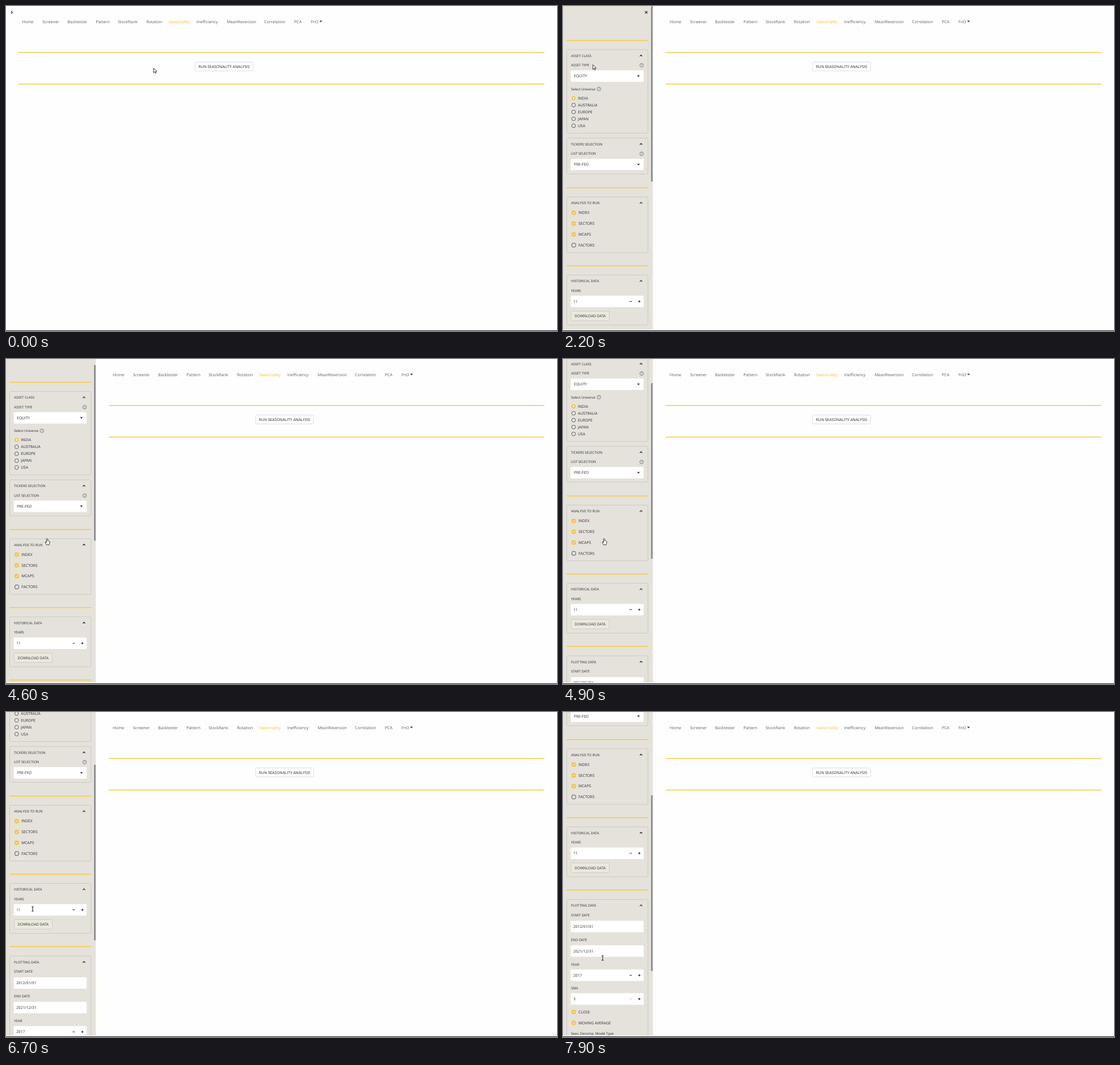
Write an HTML page with a canvas that moves like this. It is 960 px wide and 566 px high and loops after 8000 ms.

```html
<!DOCTYPE html>
<html lang="en">
<head>
<meta charset="utf-8">
<title>Seasonality dashboard</title>
<style>
html, body { margin: 0; width: 100%; height: 100%; overflow: hidden; background: #fefefe; }
canvas { display: block; }
</style>
</head>
<body>
<canvas id="stage" width="960" height="566"></canvas>
<script>
const ctx = document.getElementById('stage').getContext('2d');
const LOOP = 8000, STEP = 100, FULL = 158;
const INK = '#2b2c33', GOLD = '#f5c53a', PANEL = '#e5e2db', EDGE = '#cdcac3';

// time, pointer x, pointer y, sidebar scroll
const keys = [
  [0, 257, 108, 0], [900, 13, 11, 0], [1100, 9.5, 12.5, 0], [1500, 9.5, 12.5, 0],
  [1800, 12, 51, 0], [2300, 62, 115, 0], [2500, 62, 115, 0], [3100, 31, 160, 0],
  [3200, 31, 160, 0], [3300, 33.5, 161, 0], [3600, 33.5, 161, 0], [3700, 34.5, 162, 0],
  [4500, 71.5, 312.5, 0], [4900, 71.5, 312.5, 78], [5400, 23, 299, 113], [5700, 23, 299, 113],
  [6500, 46.5, 343, 170], [6700, 46.5, 343, 170], [7300, 69, 428.5, 225],
  [7400, 69, 428.5, 225], [7900, 69, 428.5, 268.5]
];

const nav = [['Home', 28], ['Screener', 63.5], ['Backtester', 107], ['Pattern', 156.5],
  ['StockRank', 195], ['Rotation', 244.5], ['Seasonality', 283.3], ['Inefficiency', 332],
  ['MeanReversion', 385], ['Correlation', 450], ['PCA', 502], ['FnO', 531]];

function stateAt(t) {
  const i = keys.findIndex(k => k[0] > t);
  if (i < 0) return keys[keys.length - 1].slice(1);
  const a = keys[i - 1], b = keys[i], p = (t - a[0]) / (b[0] - a[0]);
  return [1, 2, 3].map(n => a[n] + (b[n] - a[n]) * p);
}

// how far the sidebar still is from its full width
function widthLeft(t) {
  if (t < 1200) return FULL;
  return t < 1800 ? FULL * 0.4458 ** ((t - 1200) / 100) : 0;
}

function text(s, x, y, size = 6.6, color = INK, align = 'left') {
  ctx.font = `${size}px "Open Sans", "Noto Sans", sans-serif`;
  ctx.textAlign = align;
  ctx.fillStyle = color;
  ctx.fillText(s, x, y + size * 0.36);
}

function box(x, y, w, h, r, fill, stroke) {
  ctx.beginPath();
  ctx.roundRect(x, y, w, h, r);
  if (fill) { ctx.fillStyle = fill; ctx.fill(); }
  if (stroke) { ctx.strokeStyle = stroke; ctx.lineWidth = 1; ctx.stroke(); }
}

function path(points, color, width = 1.1) {
  ctx.beginPath();
  points.forEach(p => ctx.lineTo(...p));
  ctx.strokeStyle = color;
  ctx.lineWidth = width;
  ctx.stroke();
}

function caret(x, y, color = INK) {
  ctx.beginPath();
  ctx.moveTo(x - 2.5, y - 1.2);
  ctx.lineTo(x + 2.5, y - 1.2);
  ctx.lineTo(x, y + 1.6);
  ctx.fillStyle = color;
  ctx.fill();
}

function ring(x, y, r, color, width, fill) {
  ctx.beginPath();
  ctx.arc(x, y, r, 0, 7);
  if (fill) { ctx.fillStyle = fill; ctx.fill(); }
  ctx.strokeStyle = color;
  ctx.lineWidth = width;
  ctx.stroke();
}

function rule(x1, x2, y, h = 1.5, color = '#f2cb4a') {
  ctx.fillStyle = color;
  ctx.fillRect(x1, y - h / 2, x2 - x1, h);
}

function drawMain(shift) {
  for (const [name, x] of nav)
    text(name, x + shift, 27, 7.05, name === 'Seasonality' ? '#fdbd2c' : '#5c5e62');
  caret(548.5 + shift, 26.8, '#444');
  rule(21 + shift, 938, 81);
  rule(21 + shift, 938, 136);
  const bx = 329 + shift * 2 / 3;
  box(bx + .5, 97.5, 101, 15.5, 2, '#fff', '#dcdcdc');
  text('RUN SEASONALITY ANALYSIS', bx + 51, 105.3, 6.65, '#222', 'center');
}

// left = shift of the content, d = missing width
function drawSidebar(d, scroll) {
  const left = -3.2 * d, w = 156.5 - d, fieldEnd = Math.max(16, 140.5 - 4.07 * d);
  const label = (s, y) => text(s, 14, y, 5.95);
  const help = (x, y) => {
    ring(x, y, 3.2, '#66676b', .8);
    text('?', x, y, 5, '#55565b', 'center');
  };
  const group = (title, top, bottom) => {
    box(6.5, top + .5, w - 15, bottom - top - 1, 2, null, EDGE);
    label(title, top + 11);
    const x = w - 20.5, y = top + 11;
    path([[x - 2.2, y + 1.1], [x, y - 1.1], [x + 2.2, y + 1.1]], INK);
  };
  const field = (s, y, x = 18) => {
    box(13.5, y - 10, fieldEnd - 13.5, 20, 1.5, '#fff');
    text(s, x, y);
  };
  const select = (s, y) => { field(s, y, 19); caret(fieldEnd - 9, y); };
  const number = (s, y, atMin) => {
    field(s, y);
    const m = fieldEnd - 22.5, p = fieldEnd - 7.5;
    path([[m - 2, y], [m + 2, y]], atMin ? '#ccc' : INK, 1.2);
    path([[p - 2, y], [p + 2, y]], INK, 1.2);
    path([[p, y - 2], [p, y + 2]], INK, 1.2);
  };
  const check = (s, y, on = true) => {
    box(15.5, y - 3.2, 6.5, 6.5, 1.5, on ? GOLD : null, on ? GOLD : '#55565b');
    if (on) path([[17, y], [18.3, y + 1.4], [20.7, y - 1.4]], '#fff', 1);
    text(s, 27, y);
  };
  const line = y => rule(6, w - 8, y, 1.4, '#f6c83f');

  ctx.save();
  ctx.beginPath();
  ctx.rect(0, 0, Math.max(0, left + w), 564);
  ctx.clip();
  ctx.fillStyle = PANEL;
  ctx.fillRect(0, 0, 960, 564);
  ctx.translate(left, -scroll);

  const cx = w - 11.5;
  path([[cx - 2.2, 8.8], [cx + 2.2, 13.2]], INK, 1.2);
  path([[cx - 2.2, 13.2], [cx + 2.2, 8.8]], INK, 1.2);
  [60, 316.5, 452.5, 578.5].forEach(line);

  group('ASSET CLASS', 75.5, 222);
  label('ASSET TYPE', 103.3);
  help(fieldEnd - 3.5, 103.3);
  select('EQUITY', 122);
  label('Select Universe', 144.5);
  help(62.5, 144.5);
  ['INDIA', 'AUSTRALIA', 'EUROPE', 'JAPAN', 'USA'].forEach((s, i) => {
    const y = 160.5 + 12 * i;
    if (i) ring(18.5, y, 3.3, '#55565b', .9);
    else ring(18.5, y, 2.5, GOLD, 2.2, '#fff');
    text(s, 26, y);
  });

  group('TICKERS SELECTION', 229.5, 293);
  label('LIST SELECTION', 257.3);
  help(fieldEnd - 3.5, 257.3);
  select('PRE-FED', 276);

  group('ANALYSIS TO RUN', 332, 430);
  ['INDEX', 'SECTORS', 'MCAPS', 'FACTORS'].forEach((s, i) => check(s, 360 + 18.8 * i, i < 3));

  group('HISTORICAL DATA', 468, 556);
  label('YEARS', 495.7);
  number('11', 514.5);
  box(14, 531.5, 66.5, 16.5, 1.5, '#ebe9dd', '#cfcdc2');
  text('DOWNLOAD DATA', 47.3, 539.8, 6.4, INK, 'center');

  group('PLOTTING DATA', 594.5, 900);
  label('START DATE', 622.2);
  field('2012/01/01', 642);
  label('END DATE', 665);
  field('2021/12/31', 684.7);
  label('YEAR', 708);
  number('2017', 727);
  label('SMA', 749.5);
  number('3', 768.2, true);
  check('CLOSE', 790.7);
  check('MOVING AVERAGE', 809.7);
  label('Seas. Decomp. Model Type', 828.3);

  ctx.translate(0, scroll);
  box(w - 3, scroll * .54, 2.7, 306 - .43 * d, 1, '#85858a');
  ctx.restore();
}

const arrow = new Path2D('M0 0V8.2L2 6.4L3.4 9.3L4.8 8.6L3.4 5.9H5.9Z');
const hand = new Path2D('M-1 .8Q0-.8 1 .8V4Q2 3.2 2.7 4.2Q3.6 3.7 4.2 4.8Q5 5 4.8 6.5L4.4 8.8L3.5 11.2H-.8L-3 7.6Q-3.6 6 -2.4 5.9L-1 7.2Z');

function drawPointer(t, x, y) {
  ctx.save();
  ctx.translate(x, y);
  if (t >= 6400) {
    path([[-1.8, -3.8], [1.8, -3.8]], '#222', 1);
    path([[0, -3.8], [0, 3.8]], '#222', 1);
    path([[-1.8, 3.8], [1.8, 3.8]], '#222', 1);
  } else {
    const shape = t >= 3100 && t < 5300 ? hand : arrow;
    ctx.fillStyle = '#fff';
    ctx.strokeStyle = '#222';
    ctx.lineWidth = .9;
    ctx.fill(shape);
    ctx.stroke(shape);
  }
  ctx.restore();
}

function draw(now) {
  const t = Math.floor(now % LOOP / STEP) * STEP;
  const [x, y, scroll] = stateAt(t), d = widthLeft(t);
  ctx.textRendering = 'geometricPrecision';
  ctx.fillStyle = '#fefefe';
  ctx.fillRect(0, 0, 960, 566);
  drawMain(FULL - d);
  if (d === FULL) path([[8.8, 8.6], [11.2, 10.9], [8.8, 13.2]], '#222', 1.2);
  else drawSidebar(d, scroll);
  ctx.fillStyle = '#161616';
  ctx.fillRect(0, 565, 960, 1);
  drawPointer(t, x, y);
}

let start;
function tick(now) {
  start ??= now;
  draw(now - start);
  requestAnimationFrame(tick);
}
draw(0);
requestAnimationFrame(tick);
</script>
</body>
</html>
```
